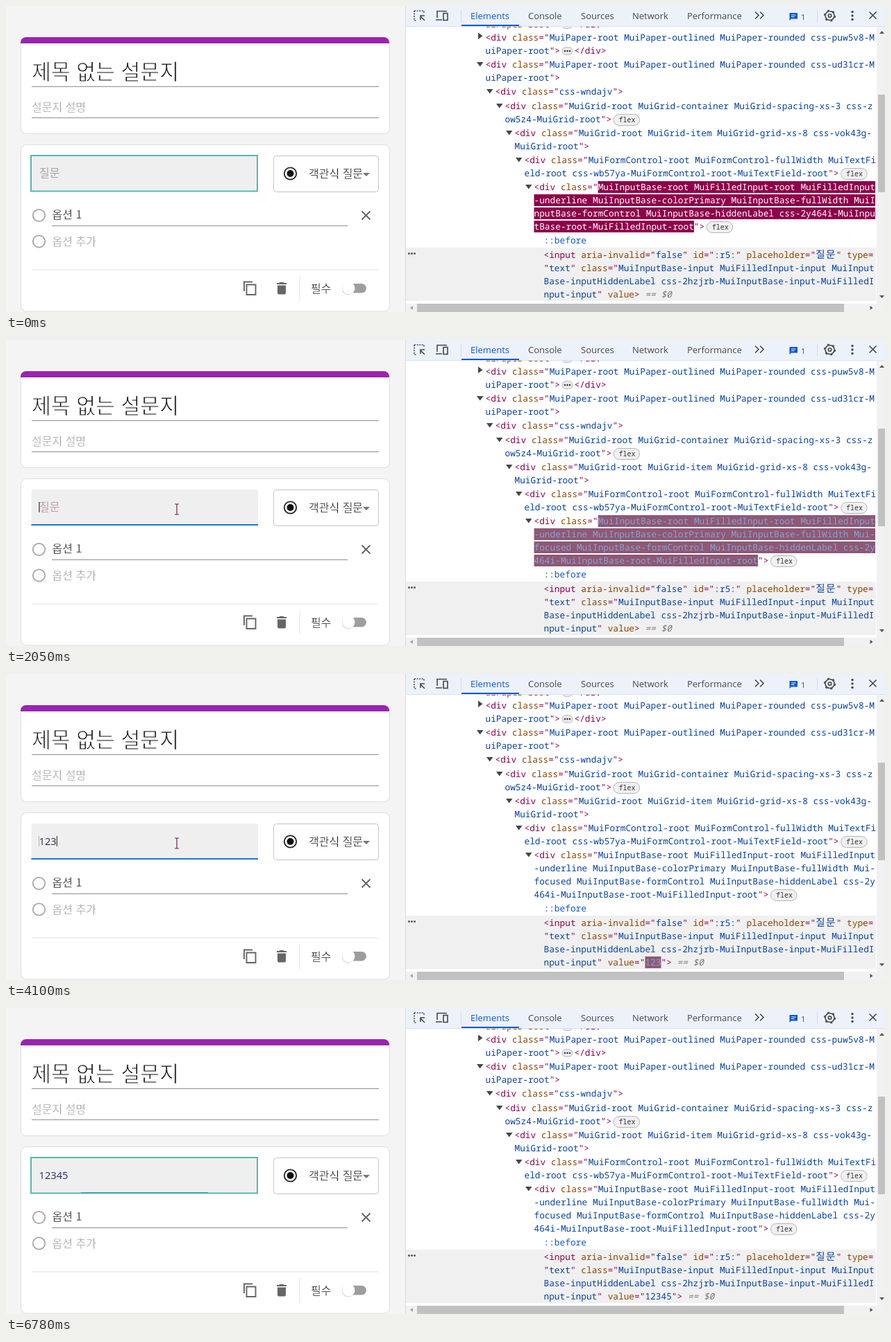
Animation of 1266x442 px, one loop 6.85 s. Source, as an HTML page:

```html
<!DOCTYPE html>
<html lang="ko">
<head>
<meta charset="utf-8">
<title>Form and inspector</title>
<style>
  html, body { margin: 0; width: 100%; height: 100%; overflow: hidden; background: #fff; }
  svg { display: block; width: 1266px; height: 442px; }
  text { white-space: pre; }
  /* A thin outline in the background colour lightens the strokes of the Korean text. */
  .ko { font: 300 16px "Noto Sans CJK KR", "Noto Sans CJK", sans-serif; fill: #222; stroke: #fff; stroke-width: .3; }
  .ko.title { font-size: 30.3px; stroke-width: .9; fill: #111; }
  .ko.hint { fill: #a0a0a0; }
  .ko.onField { stroke: none; }
  .digits { font: 14.7px "Open Sans", "Noto Sans", sans-serif; }
  .code { font: 12.8px "Noto Sans Mono", "DejaVu Sans Mono", monospace; text-rendering: geometricPrecision; }
  .tag { fill: #8e004b; }
  .attr { fill: #8c4200; }
  .value { fill: #0842a0; }
  .pseudo { fill: #0b57d0; }
  .note { fill: #747775; font-style: italic; }
  .hangul { font: 14.5px "Noto Sans CJK KR", "Noto Sans CJK", sans-serif; letter-spacing: 1.4px; }
  .mark { fill: transparent; }
  .chip { font: 10px "Noto Sans Mono", monospace; fill: #333; }
  .tab { font: 13px "Open Sans", "Noto Sans", sans-serif; fill: #474747; }
  .tip { font: 600 11.8px "Open Sans", "Noto Sans", sans-serif; fill: #1a1aa6; }
  .rule { stroke: #8e8e8e; }
  .icon { fill: none; stroke: #474747; stroke-width: 1.6; }
</style>
</head>
<body>
<svg viewBox="0 0 1266 442">
  <rect width="575" height="442" fill="#f4f4f4"/>

  <!-- form -->
  <g fill="#fff" stroke="#dcdee2">
    <rect x="21.5" y="45.5" width="531" height="139" rx="8"/>
    <rect x="21.5" y="200.5" width="531" height="240.5" rx="8"/>
  </g>
  <path d="M21 54v-1a8 8 0 0 1 8-8h515a8 8 0 0 1 8 8v1z" fill="#9a23b0"/>
  <text class="ko title" x="37" y="105.500">제목 없는 설문지</text>
  <text class="ko hint" x="37" y="152">설문지 설명</text>
  <path class="rule" d="M37 116.5H537M37 161.5H537M66 317.5H492"/>

  <path id="field" d="M36.5 268V220a4 4 0 0 1 4-4H359a4 4 0 0 1 4 4v48z"/>
  <path class="rule" d="M36.5 267.5H363"/>
  <text id="placeholder" class="ko onField" x="48" y="246.500">질문</text>
  <text id="typed" class="digits" x="47.5" y="247"></text>
  <rect id="underline" y="266" height="2" fill="#1976d2"/>
  <rect id="flash" x="36" y="216" width="326" height="51.500" fill="none" stroke="#55b8b0" stroke-width="2"/>
  <rect id="ghostCaret" x="47" y="234" width="1" height="15" fill="#b3b3bd"/>
  <rect id="caret" y="234" width="1" height="15" fill="#222"/>

  <rect x="385.5" y="216.5" width="151" height="52" rx="4" fill="#fff" stroke="#c4c4c4"/>
  <circle cx="409.5" cy="242" r="8.7" fill="none" stroke="#222" stroke-width="1.8"/>
  <circle cx="409.5" cy="242" r="5" fill="#111"/>
  <text class="ko" x="436" y="247.500">객관식 질문</text>
  <path d="M514 241h10l-5 5z" fill="#757575"/>

  <g fill="none" stroke="#a6a6a6" stroke-width="1.8">
    <circle cx="47.5" cy="302.5" r="8.7"/>
    <circle cx="47.5" cy="340" r="8.7"/>
  </g>
  <text class="ko" x="66.5" y="306.500">옵션 1</text>
  <text class="ko hint" x="66.5" y="346">옵션 추가</text>
  <path d="M512.5 296.500l12 12m0-12l-12 12" stroke="#666" stroke-width="2"/>
  <path d="M37 381H537M423 390v36" stroke="#e0e0e0"/>
  <path d="M343 412v-13.500h12M346.500 402.500h13v14.500h-13z" fill="none" stroke="#666" stroke-width="1.9"/>
  <path d="M390 400h3.500l1-1h5l1 1h3.500v2h-14zM391 403.500h12v11a2 2 0 0 1-2 2h-8a2 2 0 0 1-2-2z" fill="#666"/>
  <text class="ko" x="439" y="413.500">필수</text>
  <rect x="486" y="401" width="33" height="13.5" rx="6.700" fill="#9e9e9e"/>
  <circle cx="493" cy="408.500" r="9" fill="#ccc"/>
  <circle cx="493.500" cy="407.700" r="9" fill="#fff"/>

  <!-- inspector -->
  <rect x="575" width="691" height="442" fill="#fff"/>
  <rect x="576" y="349" width="677" height="77" fill="#f0f0f0"/>
  <path d="M575.500 0V442" stroke="#d5d9e0"/>
  <g fill="#555"><circle cx="580.500" cy="357.500" r="1.500"/><circle cx="584.500" cy="357.500" r="1.500"/><circle cx="588.500" cy="357.500" r="1.500"/></g>
  <g id="tree"></g>

  <rect x="576" width="690" height="29" fill="#edf2fa"/>
  <path d="M576 29.500H1266" stroke="#d3e3fd"/>
  <path d="M656 28H739" stroke="#0b57d0" stroke-width="2"/>
  <path d="M655.500 6v17M1168.500 6v17" stroke="#cfdcf0"/>
  <g class="icon">
    <path d="M588 7h14v4M588 7v14h4" stroke-dasharray="2 1.600"/>
    <path d="M603 21l-6-6m0 5v-6h6" />
    <path d="M621 17V7.500h14M619 20h9"/>
    <rect x="630" y="10.500" width="6" height="10"/>
    <path d="M1079 8.500l5 5-5 5m7-10l5 5-5 5"/>
    <path d="M1243.500 8.500l10 10m0-10l-10 10"/>
    <circle cx="1186.500" cy="14" r="2.300"/>
    <circle cx="1186.500" cy="14" r="6.500"/>
    <circle cx="1186.500" cy="14" r="7.800" stroke-dasharray="3 5.170"/>
  </g>
  <g fill="#474747"><circle cx="1219" cy="8.500" r="1.700"/><circle cx="1219" cy="14" r="1.700"/><circle cx="1219" cy="19.500" r="1.700"/></g>
  <path d="M1128.500 10h11.500v8.500h-9l-2.500 2.500z" fill="#0b57d0"/>
  <path d="M1131 13h6.500m-6.500 2.500h4.500" stroke="#fff"/>
  <g class="tab">
    <text x="669" y="18.500" style="fill:#0b57d0">Elements</text>
    <text x="752" y="18.500">Console</text>
    <text x="828" y="18.500">Sources</text>
    <text x="902" y="18.500">Network</text>
    <text x="981" y="18.500">Performance</text>
    <text x="1145" y="20" font-size="11">1</text>
  </g>

  <path d="M1254 30h12V442H576V430H1254z" fill="#f1f1f1"/>
  <path d="M1256 128h10V269h-10zM592 430H1207V442H592z" fill="#c1c1c1"/>
  <path d="M1258 40l3.500-4 3.500 4zM1258 418l3.500 4 3.500-4z" fill="#555"/>
  <path d="M586 433l-4 3 4 3z" fill="#a3a3a3"/>
  <path d="M1244.500 433l4 3-4 3z" fill="#555"/>

  <!-- highlight overlay and tooltip -->
  <g id="overlay">
    <rect x="36.500" y="216" width="326.500" height="52" fill="#bdd7b0"/>
    <rect x="48" y="231" width="304" height="21" fill="#9bbfe3"/>
    <text class="ko onField" x="48" y="246.500" style="fill:#86a0bd">질문</text>
    <path class="rule" d="M36.500 267.500H363"/>
    <path style="filter:drop-shadow(0 1px 2px #0006)" fill="#fff"
      d="M39 150H312a3 3 0 0 1 3 3V205a3 3 0 0 1-3 3H60l-7 7-7-7H39a3 3 0 0 1-3-3V153a3 3 0 0 1 3-3z"/>
    <g class="tip">
      <text x="45" y="168"><tspan fill="#881280">input</tspan>#:r5:.MuiInputBase-input.M</text>
      <text x="45" y="184">uiFilledInput-input.MuiInputBase</text>
      <text x="45" y="200">-inputHiddenLabel.css…</text>
      <text x="247" y="184" style="font-size:11px;font-weight:400;fill:#5f6368">350.66 × 56</text>
    </g>
  </g>

  <path id="arrow" d="M.5 .5V15l3.300-3 2.200 5 2.200-1-2.200-4.800h4.300z" fill="#fff" stroke="#1c1c5c"/>
  <path id="ibeam" d="M-3-7.500h2.300l.7.600.700-.600H3M0-7V7M-3 7.500h2.300l.7-.600.700.600H3" fill="none" stroke-width="1.200"/>
</svg>

<script>
const LOOP = 6850, CELL = 7.68, LINE = 19, FADE = 1400;
const FOCUS = 1650, CLASS_CHANGE = 1780, BLUR = 6780, BLINK = 525;
const $ = id => document.getElementById(id);
const show = (el, on) => { el.style.display = on ? '' : 'none'; };
const within = (t, ...spans) => spans.some(([a, b]) => t >= a && t < b);

function add(parent, name, attrs, content = '') {
  const el = document.createElementNS('http://www.w3.org/2000/svg', name);
  for (const key in attrs) el.setAttribute(key, attrs[key]);
  el.textContent = content;
  return parent.appendChild(el);
}

// Writes lines of markup in syntax colours; a quoted value may run over several lines.
function writeCode(parent, x, y, lines, marked = false) {
  let quoted = false;
  lines.forEach((line, i) => {
    const base = y + i * LINE;
    const text = add(parent, 'text', { class: 'code', x, y: base });
    const pieces = line.match(/"|== \$0|::\w+|[가-힣]+|<\/?\w+|[>=]|[^"<>=가-힣]+/g);
    let column = 0;
    for (const piece of pieces) {
      let kind = 'attr';
      if (piece === '"') { quoted = !quoted; kind = 'tag'; }
      else if (quoted) kind = 'value';
      else if (piece.startsWith('==')) kind = 'note';
      else if (piece.startsWith('::')) kind = 'pseudo';
      else if (/[<>=]/.test(piece)) kind = 'tag';
      if (/[가-힣]/.test(piece)) kind += ' hangul';
      const isMarked = marked && kind === 'value';
      if (isMarked) {
        const mark = add(parent, 'rect', { class: 'mark', x: x + column * CELL, y: base - 13, width: piece.length * CELL, height: 17 });
        parent.insertBefore(mark, parent.firstChild);
      }
      add(text, 'tspan', { class: kind + (isMarked ? ' fresh' : '') }, piece);
      column += piece.length;
    }
  });
}

function flexChip(parent, x, y) {
  add(parent, 'rect', { x: x + 3, y: y - 11.5, width: 37.5, height: 16, rx: 8, fill: '#f0f0f0', stroke: '#b5b5b5' });
  add(parent, 'text', { class: 'chip', x: x + 10.5, y }, 'flex');
}

function dotsChip(parent, x, y) {
  add(parent, 'rect', { x: x + 3, y: y - 9.5, width: 15, height: 11, rx: 5.5, fill: '#e9e9e9', stroke: '#bbb' });
  for (let i = 0; i < 3; i++) add(parent, 'circle', { cx: x + 7 + i * 3.5, cy: y - 4, r: 1.2, fill: '#333' });
  writeCode(parent, x + 20.5, y, ['</div>']);
}

const tree = $('tree');
const indent = depth => 690.5 + depth * 14;
const endOf = (x, line) => x + line.length * CELL;
const lastLine = lines => lines[lines.length - 1];

function arrowMark(depth, y, open = true) {
  const x = indent(depth) - 8;
  add(tree, 'path', { fill: '#474747', d: open ? `M${x - 4.5} ${y - 8}h9.5l-4.75 6.5z` : `M${x - 2.5} ${y - 11.5}v9.5l6.5-4.75z` });
}

const nodes = [
  [0, ['<div class="MuiPaper-root MuiPaper-outlined MuiPaper-rounded css-puw5v8-M', 'uiPaper-root">'], dotsChip],
  [0, ['<div class="MuiPaper-root MuiPaper-outlined MuiPaper-rounded css-ud31cr-M', 'uiPaper-root">']],
  [1, ['<div class="css-wndajv">']],
  [2, ['<div class="MuiGrid-root MuiGrid-container MuiGrid-spacing-xs-3 css-z', 'ow5z4-MuiGrid-root">'], flexChip],
  [3, ['<div class="MuiGrid-root MuiGrid-item MuiGrid-grid-xs-8 css-vok43g-', 'MuiGrid-root">']],
  [4, ['<div class="MuiFormControl-root MuiFormControl-fullWidth MuiTextFi', 'eld-root css-wb57ya-MuiFormControl-root-MuiTextField-root">'], flexChip],
];

writeCode(tree, indent(0), 31, ['uiPaper-root']);
dotsChip(tree, endOf(indent(0), 'uiPaper-root">'), 31);

// Each node takes a little more than its lines; text sits on whole pixels.
let flow = 50;
function place(lineCount) {
  const y = Math.round(flow);
  flow += LINE * lineCount + 1.2;
  return y;
}

for (const [depth, lines, chip] of nodes) {
  const y = place(lines.length);
  arrowMark(depth, y, chip !== dotsChip);
  writeCode(tree, indent(depth), y, lines);
  if (chip) chip(tree, endOf(indent(depth), lastLine(lines)), y + LINE * (lines.length - 1));
}

// A version of some code that is on stage for a while, its new values lit up at first.
const versions = [];
function addVersion(from, to, litAt, x, y, lines, chip) {
  const group = add(tree, 'g', {});
  writeCode(group, x, y, lines, true);
  if (chip) chip(group, endOf(x, lastLine(lines)), y + LINE * (lines.length - 1));
  const fade = (selector, frames) => [...group.querySelectorAll(selector)].map(el => {
    const animation = el.animate(frames, { duration: FADE });
    animation.pause();
    return animation;
  });
  const fades = [
    ...fade('.mark', [
      { fill: '#8e004b', easing: 'ease' },
      { fill: '#8f8f8f', offset: .8, easing: 'ease' },
      { fill: 'rgba(143,143,143,0)' }]),
    ...fade('.fresh', [{ fill: '#fff', easing: 'ease' }, { fill: '#0842a0' }]),
  ];
  versions.push({ group, from, to, litAt, fades });
}

const classY = place(4);
arrowMark(5, classY);
const rootStart = '<div class="MuiInputBase-root MuiFilledInput-root MuiFilledInput';
addVersion(0, CLASS_CHANGE, 0, indent(5), classY, [
  rootStart,
  '-underline MuiInputBase-colorPrimary MuiInputBase-fullWidth MuiI',
  'nputBase-formControl MuiInputBase-hiddenLabel css-2y464i-MuiInpu',
  'tBase-root-MuiFilledInput-root">'], flexChip);
addVersion(CLASS_CHANGE, LOOP, FOCUS, indent(5), classY, [
  rootStart,
  '-underline MuiInputBase-colorPrimary MuiInputBase-fullWidth Mui-',
  'focused MuiInputBase-formControl MuiInputBase-hiddenLabel css-2y',
  '464i-MuiInputBase-root-MuiFilledInput-root">'], flexChip);
writeCode(tree, indent(6), place(1), ['::before']);

const inputY = place(4);
writeCode(tree, indent(6), inputY, [
  '<input aria-invalid="false" id=":r5:" placeholder="질문" type=',
  '"text" class="MuiInputBase-input MuiFilledInput-input MuiInput',
  'Base-inputHiddenLabel css-2hzjrb-MuiInputBase-input-MuiFilledI']);

// The tail of the class value stays unlit, so it is written apart from the typed value.
const valueY = inputY + 3 * LINE;
const classTail = 'nput-input';
const tailX = endOf(indent(6), classTail);
add(tree, 'text', { class: 'code value', x: indent(6), y: valueY }, classTail);
add(tree, 'text', { class: 'code tag', x: tailX, y: valueY }, '"');
const keyTimes = [2700, 3000, 3690, 4130, 4540];
for (let n = 0; n <= keyTimes.length; n++) {
  const from = n ? keyTimes[n - 1] : 0;
  const value = n ? `="${'12345'.slice(0, n)}"` : '';
  addVersion(from, keyTimes[n] ?? LOOP, from, tailX + 2 * CELL, valueY, [`value${value}> == $0`]);
}

const pointer = [
  [350, 643, 398], [480, 636, 396], [740, 603, 388], [810, 601, 387], [900, 601, 387],
  [1040, 560, 368], [1400, 246, 244.5], [5270, 246, 244.5], [5500, 590, 372], [5850, 650, 406], [6080, 700, 446],
];
function pointerAt(t) {
  const i = pointer.findIndex(p => p[0] > t);
  if (i < 1) return null;
  const [t0, x0, y0] = pointer[i - 1], [t1, x1, y1] = pointer[i];
  const k = (t - t0) / (t1 - t0);
  return [x0 + (x1 - x0) * k, y0 + (y1 - y0) * k];
}

function render(t) {
  for (const { group, from, to, litAt, fades } of versions) {
    show(group, t >= from && t < to);
    for (const fade of fades) fade.currentTime = Math.max(-1, Math.min(FADE, t - litAt));
  }

  const count = keyTimes.filter(k => k <= t).length;
  const focused = t >= FOCUS && t < BLUR;
  const lastKey = count ? keyTimes[count - 1] : FOCUS;
  const settled = t >= CLASS_CHANGE;

  show($('placeholder'), !count);
  $('placeholder').style.fill = settled ? '#bd9fae' : '#a6a6a6';
  $('typed').textContent = '12345'.slice(0, count);
  $('typed').style.fill = t >= BLUR ? '#262c66' : count < 3 ? '#2c4a8c' : '#26304e';
  $('field').style.fill = within(t, [1300, CLASS_CHANGE]) ? '#ebebeb' : '#efefef';
  show($('flash'), within(t, [0, 280], [1640, 1930], [BLUR, LOOP]));
  show($('ghostCaret'), settled && focused);
  show($('caret'), focused && Math.floor((t - lastKey) / BLINK) % 2 === 0);
  $('caret').setAttribute('x', 47.5 + count * 8.45);

  const grow = Math.max(0, Math.min(1, (t - FOCUS) / 200));
  const scale = t >= BLUR ? .56 : 1 - (1 - grow) ** 2;
  $('underline').setAttribute('x', 199.75 - 163.25 * scale);
  $('underline').setAttribute('width', 326.5 * scale);

  show($('overlay'), within(t, [350, 1010], [5490, 5900]));

  const at = pointerAt(t);
  const overField = at && at[0] < 363 && at[1] < 268;
  show($('arrow'), at && !overField);
  show($('ibeam'), overField);
  if (at) {
    const move = `translate(${at[0]} ${at[1]})`;
    $('arrow').setAttribute('transform', move);
    $('ibeam').setAttribute('transform', move);
  }
  $('ibeam').style.stroke = settled ? '#7a2050' : '#444';
}

const start = performance.now();
function tick() {
  render((performance.now() - start) % LOOP);
  requestAnimationFrame(tick);
}
tick();
</script>
</body>
</html>
```
